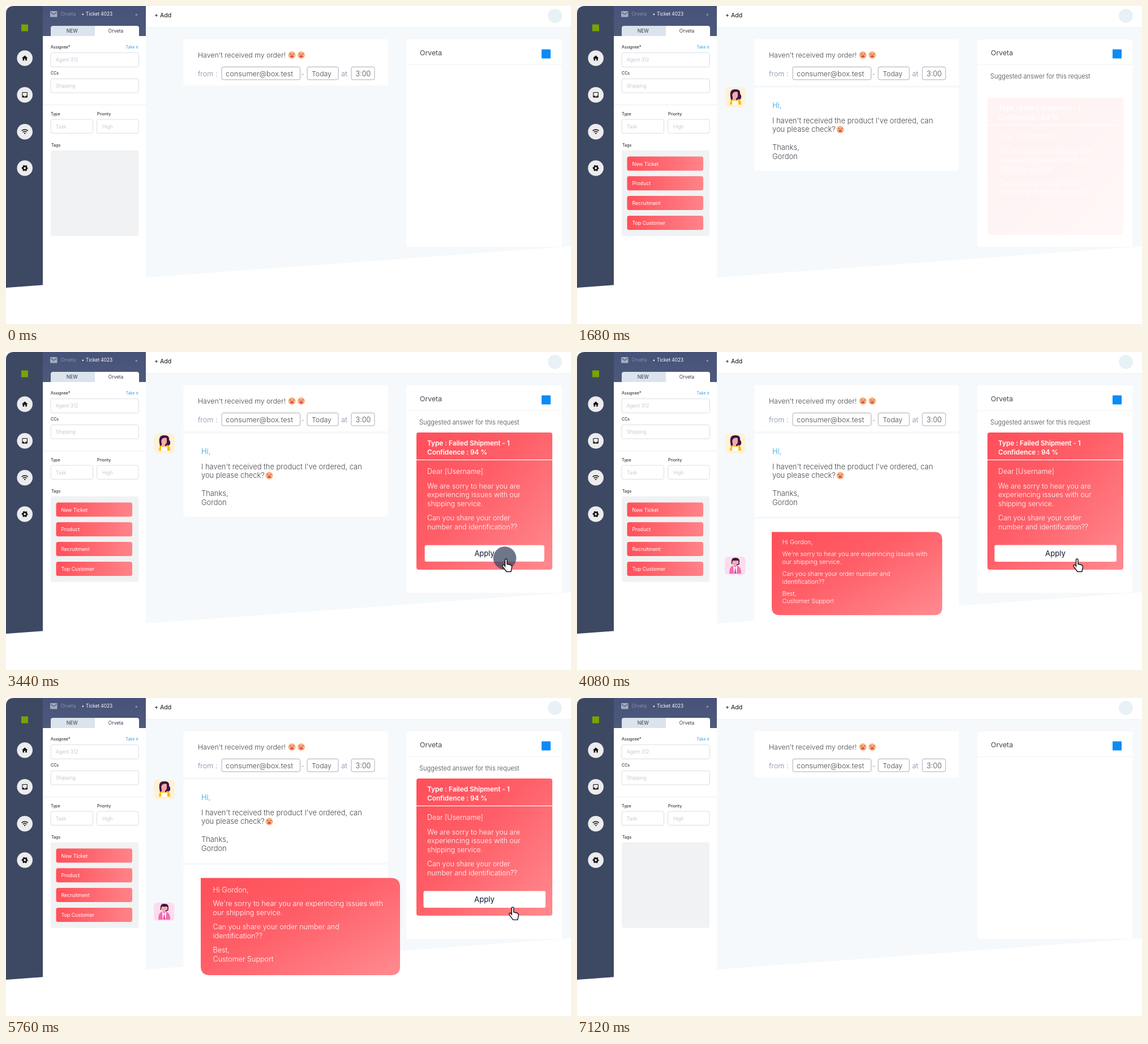
Recreate the animation shown at these times as an HTML page. Size 998 by 561 pixels, loop 7320 ms.

```html
<!DOCTYPE html>
<html lang="en">
<head>
<meta charset="utf-8">
<title>Support desk</title>
<style>
  html, body { margin: 0; width: 100%; height: 100%; overflow: hidden; background: #fff; }
  svg { display: block; width: 998px; height: 561px; }
  text { font-family: Inter, "Open Sans", sans-serif; font-weight: 300; fill: #45474d; white-space: pre; }
  .mid { font-weight: 400; }
  .label { font-size: 7.1px; font-weight: 400; fill: #111; }
  .hint { font-size: 8.5px; fill: #b4bac4; }
  .field { fill: #fff; stroke: #dadee4; }
  .pill { fill: #fff; stroke: #a9adb3; }
  .slate { fill: #7f8aa6; }
  .body { font-size: 12.9px; }
  .title { font-size: 12.3px; }
  .white text { fill: #fff; }
</style>
</head>
<body>
<svg viewBox="0 0 998 561">
  <defs>
    <linearGradient id="red" x2="1" y2=".9">
      <stop stop-color="#ff4f5a"/><stop offset=".45" stop-color="#ff5e67"/><stop offset="1" stop-color="#ff878d"/>
    </linearGradient>
    <linearGradient id="tagRed">
      <stop stop-color="#ff505a"/><stop offset="1" stop-color="#ff8389"/>
    </linearGradient>
    <linearGradient id="head" x2="0" y2="1">
      <stop stop-color="#47527a"/><stop offset="1" stop-color="#4d5a7a"/>
    </linearGradient>
    <g id="face">
      <circle r="6.5" fill="#fab27f"/>
      <path d="M-4-2.5l3 1.5M4-2.5l-3 1.5" stroke="#8a4b38"/>
      <path d="M-3 3.8a3 3.2 0 0 1 6 0z" fill="#d8434e"/>
    </g>
  </defs>

  <!-- page -->
  <path d="M247 0H998V424L247 479z" fill="#f5f9fc"/>
  <path d="M247 0H998V37.5H247z" fill="#fff"/>
  <path d="M247 37.5H998" stroke="#eef2f5"/>
  <path d="M0 14Q0 0 14 0H65V492.3L0 497z" fill="#3d4863"/>
  <path d="M65 0H247V53H65z" fill="url(#head)"/>
  <rect x="27" y="32.5" width="12" height="12" fill="#78a300"/>
  <g id="icons"></g>

  <!-- ticket form -->
  <rect x="78" y="9" width="12.5" height="10.5" rx="1" fill="#a3abbe"/>
  <path d="M79 11l5.2 3.8L89.500 11" fill="none" stroke="#4a5678" stroke-width="1.2"/>
  <text x="96.500" y="17" font-size="8.6" style="fill:#98a2ba">Orveta</text>
  <g class="white">
    <text x="133.500" y="17" font-size="8.300" class="mid">•</text>
    <text x="141" y="17" font-size="8.300" class="mid">Ticket 4023</text>
    <text x="228" y="17" font-size="7">×</text>
  </g>
  <path d="M79 53V39q0-4 4-4H157V53z" fill="#dbe3ec"/>
  <path d="M157 53V35H231q4 0 4 4V53z" fill="#fff"/>
  <g text-anchor="middle">
    <text x="116.800" y="47" font-size="8.600" class="mid" style="fill:#30394f">NEW</text>
    <text x="194" y="47" font-size="8.300" class="mid" style="fill:#30394f">Orveta</text>
  </g>
  <text x="79" y="75" class="label">Assignee*</text>
  <text x="233.500" y="75" class="label" text-anchor="end" style="fill:#2f9de0">Take it</text>
  <rect class="field" x="79" y="82.500" width="155.500" height="25" rx="3"/>
  <text x="88" y="98.300" class="hint">Agent 312</text>
  <text x="79" y="121" class="label">CCs</text>
  <rect class="field" x="79" y="128.500" width="155.500" height="24.500" rx="3"/>
  <text x="88" y="144" class="hint">Shipping</text>
  <path d="M65 174.500H247" stroke="#eceef1"/>
  <text x="79" y="192.500" class="label">Type</text>
  <text x="161" y="192.500" class="label">Priority</text>
  <rect class="field" x="79" y="200" width="74.500" height="24.500" rx="3"/>
  <rect class="field" x="160.500" y="200" width="73.500" height="24.500" rx="3"/>
  <text x="88" y="215.500" class="hint">Task</text>
  <text x="170" y="215.500" class="hint">High</text>
  <text x="80" y="247.500" class="label">Tags</text>
  <rect x="79" y="254.500" width="155" height="151" rx="4" fill="#f1f2f3"/>
  <g id="tags" class="white"></g>

  <!-- request -->
  <text x="262" y="19.700" font-size="10.600" class="mid" style="fill:#111">+ Add</text>
  <circle cx="969.500" cy="17.500" r="12.500" fill="#e8f1f6"/>
  <rect x="313.500" y="58.500" width="361" height="81.500" rx="3" fill="#fff"/>
  <text x="339" y="91" class="title">Haven't received my order!</text>
  <use href="#face" x="505" y="86.500"/>
  <use href="#face" x="521.500" y="86.500"/>
  <text x="339" y="124" font-size="12.700" class="slate">from :</text>
  <rect class="pill" x="381" y="107.500" width="138.500" height="22.500" rx="3"/>
  <text x="388" y="124" font-size="12.800">consumer@box.test</text>
  <text x="521.500" y="124" font-size="12" class="slate">-</text>
  <rect class="pill" x="532" y="107.500" width="55" height="22.500" rx="3"/>
  <text x="540" y="124" class="title">Today</text>
  <text x="592" y="124" font-size="12.800" class="slate">at</text>
  <rect class="pill" x="610" y="107.500" width="41" height="22.500" rx="3"/>
  <text x="617.500" y="124" font-size="12.600">3:00</text>

  <g id="customer">
    <rect x="261" y="143.500" width="37" height="35" rx="8" fill="#fff1d6"/>
    <path d="M271 160q-2-13 8-13 10-1 9 8 4 4 1 9-7 5-17 2z" fill="#3b1646"/>
    <path d="M276 153q3-3 8-1v7q-1 4-3 4v6h-6v-8q-2-5 1-8z" fill="#f9a9a6"/>
    <path d="M270 174q0-9 6-10l4 3 5-3q5 1 5 10z" fill="#fdb917"/>
    <path d="M274 174v-7h11v7z" fill="#fff"/>
  </g>
  <g id="message" class="body">
    <rect x="313.500" y="144" width="361" height="146.500" rx="3" fill="#fff"/>
    <text x="345" y="180" class="mid" style="fill:#5cb3e6">Hi,</text>
    <text x="345" y="206.500">I haven't received the product I've ordered, can</text>
    <text x="345" y="222">you please check?</text>
    <use href="#face" x="465" y="218"/>
    <text x="345" y="253.500">Thanks,</text>
    <text x="345" y="269.500">Gordon</text>
  </g>

  <!-- suggestion -->
  <rect x="707.500" y="59" width="274" height="366" rx="4" fill="#fff"/>
  <text x="731" y="87" font-size="12.300" class="mid">Orveta</text>
  <rect x="946" y="76.500" width="16" height="16" rx="1" fill="#0a8cf5"/>
  <path d="M707.500 103.500H981.500" stroke="#eff2f4"/>
  <text id="hint" x="730" y="128" font-size="11.100">Suggested answer for this request</text>
  <g id="answer" class="white">
    <rect x="725" y="142" width="240" height="242" rx="4" fill="url(#red)"/>
    <path d="M725 190.300H965" stroke="#fff" stroke-width="1.200"/>
    <g font-size="11.800">
      <text x="744" y="164.500" style="font-weight:600">Type : Failed Shipment - 1</text>
      <text x="744" y="180.700" style="font-weight:600">Confidence : 94 %</text>
    </g>
    <g font-size="12.400">
      <text x="744" y="214.500">Dear [Username]</text>
      <text x="744" y="240.500">We are sorry to hear you are</text>
      <text x="744" y="256.300">experiencing issues with our</text>
      <text x="744" y="272">shipping service.</text>
      <text x="744" y="297">Can you share your order</text>
      <text x="744" y="313">number and identification??</text>
    </g>
    <g id="apply">
      <rect x="737.500" y="340.500" width="215.500" height="29.500" rx="3" fill="#fff"/>
      <text x="845" y="360" font-size="13.200" class="mid" text-anchor="middle" style="fill:#10142e">Apply</text>
    </g>
  </g>

  <!-- reply -->
  <rect id="replyPage" x="313.500" y="294" width="361" height="190" rx="3" fill="#fff"/>
  <g id="agent">
    <rect x="261" y="361" width="36.500" height="32" rx="6" fill="#fddcee"/>
    <path d="M269 391q0-13 7-14h6q8 1 8 14z" fill="#f46bb4"/>
    <path d="M276 377l3.500 3 3.500-3-1 13h-5z" fill="#fff"/>
    <path d="M279.500 379l1.500 11h-3z" fill="#c22d7f"/>
    <rect x="275" y="366" width="9.500" height="11.500" rx="4.500" fill="#f9a9a6"/>
    <path d="M273.500 371q-2-8 6-8 9 0 7 8l-2-3h-9z" fill="#3b1646"/>
    <path d="M273.500 369v5M286 369v5l-4 2" fill="none" stroke="#3b1646" stroke-width="1.500"/>
  </g>
  <g id="reply" class="white" font-size="12.600">
    <path d="M344 317.500H680q16 0 16 16V473q0 16-16 16H360q-16 0-16-16z" fill="url(#red)"/>
    <text x="365.500" y="342.500">Hi Gordon,</text>
    <text x="365.500" y="366.700">We're sorry to hear you are experincing issues with</text>
    <text x="365.500" y="383.300">our shipping service.</text>
    <text x="365.500" y="407.700">Can you share your order number and</text>
    <text x="365.500" y="424.300">identification??</text>
    <text x="365.500" y="448.500">Best,</text>
    <text x="365.500" y="464.800">Customer Support</text>
  </g>

  <circle id="ripple" cx="881" cy="363.500" fill="#3d4863"/>
  <path id="cursor" d="M5.500 15V3q0-2 1.800-2T9 3v7l5 1.200q4 1 3.500 4.500L16 23.500H8l-6-8q-2-3 0-4 1.500-.5 3.500 2z"
        fill="#fff" stroke="#111" stroke-width="1.400" stroke-linejoin="round"/>
</svg>
<script>
const LOOP = 7320;
const $ = id => document.getElementById(id);
const set = (el, name, value) => el.setAttribute(name, value);
const part = (t, from, to) => Math.min(1, Math.max(0, (t - from) / (to - from)));
const smooth = p => (1 - Math.cos(Math.PI * p)) / 2;
const easeOut = p => 1 - (1 - p) ** 2;
const bump = p => Math.sin(Math.PI * p);
const scaleAt = (x, y, s) => `translate(${x} ${y}) scale(${s}) translate(${-x} ${-y})`;

const iconShapes = [
  '<path transform="scale(.52) translate(-12 -12)" d="M10 20v-6h4v6h5v-8h3L12 3 2 12h3v8z"/>',
  '<path transform="scale(.53) translate(-12 -12)" d="M19 3H5a2 2 0 0 0-2 2v14a2 2 0 0 0 2 2h14a2 2 0 0 0 2-2V5a2 2 0 0 0-2-2zm0 12h-4a3 3 0 0 1-6 0H5V5h14z"/>',
  '<path d="M-5.500-1.500q5.500-4.500 11 0M-3.300 1q3.300-2.700 6.600 0" fill="none" stroke="#111" stroke-width="1.500"/><path d="M-1.700 2.600q1.700-1.200 3.400 0L0 4.500z"/>',
  '<circle r="3.200" fill="none" stroke="#111" stroke-width="2.600"/><circle r="4.800" fill="none" stroke="#111" stroke-width="1.500" stroke-dasharray="2.500 2.527" stroke-dashoffset="1.250"/>'
];
const iconY = [92, 156.7, 221.7, 286];
$('icons').innerHTML = iconShapes.map(s => `<g fill="#111"><circle r="13.800" fill="#ececee"/>${s}</g>`).join('');

const tagNames = ['New Ticket', 'Product', 'Recruitment', 'Top Customer'];
$('tags').innerHTML = tagNames.map((name, i) => {
  const y = 265.5 + 34.8 * i;
  return `<g><rect x="88.500" y="${y}" width="134.500" height="25" rx="3.500" fill="url(#tagRed)"/>
    <text x="97.500" y="${y + 16}" font-size="8.800" class="mid">${name}</text></g>`;
}).join('');

// Fade each element in and out: id, in from/to, out from/to
const fades = [
  ['customer', 160, 440, 5840, 6240],
  ['message', 200, 560, 5840, 6240],
  ['hint', 1280, 1640, 6640, 7040],
  ['answer', 1660, 2000, 6520, 6960],
  ['apply', 1960, 2240, 6520, 6960],
  ['replyPage', 3560, 3880, 5960, 6360],
  ['agent', 3560, 3880, 6360, 6680],
  ['reply', 3780, 3860, 6160, 6600],
  ['cursor', 2400, 2640, 5800, 6160]
];

function draw(t) {
  for (const [id, a, b, c, d] of fades) set($(id), 'opacity', part(t, a, b) * (1 - smooth(part(t, c, d))));

  [...$('tags').children].forEach((tag, i) => {
    const start = 545 + 160 * i;
    const p = part(t, start, start + 300);
    set(tag, 'opacity', p * (1 - part(t, 6430, 6760)));
    set(tag, 'transform', `translate(0 ${10 * (1 - p)})`);
    set(tag.lastElementChild, 'opacity', part(t, start + 270, start + 520));
  });

  set($('answer'), 'transform', `translate(0 ${22 * (1 - easeOut(part(t, 1660, 2080)))})`);
  set($('apply'), 'transform', scaleAt(845, 355, 1 - .02 * bump(part(t, 3200, 3680))));

  const away = 1 - smooth(part(t, 2400, 2880)) + smooth(part(t, 5640, 6160));
  set($('cursor'), 'transform', `translate(${876 + 92 * away} ${364 + 30 * away})`);

  const press = part(t, 3240, 3640);
  set($('ripple'), 'r', 27 * easeOut(press));
  set($('ripple'), 'opacity', Math.min(.75, 1.5 * (1 - press)));

  // Pop past full size, then settle
  const pop = 1.05 * smooth(part(t, 3780, 4200)) - .05 * smooth(part(t, 4200, 4720));
  set($('reply'), 'transform', scaleAt(344, 317.5, pop));

  [...$('icons').children].forEach((icon, i) => {
    const start = 6240 + 80 * i;
    set(icon, 'transform', `translate(33.2 ${iconY[i]}) scale(${1 + .1 * bump(part(t, start, start + 600))})`);
  });
}

function tick() {
  draw(performance.now() % LOOP);
  requestAnimationFrame(tick);
}
tick();
</script>
</body>
</html>
```
